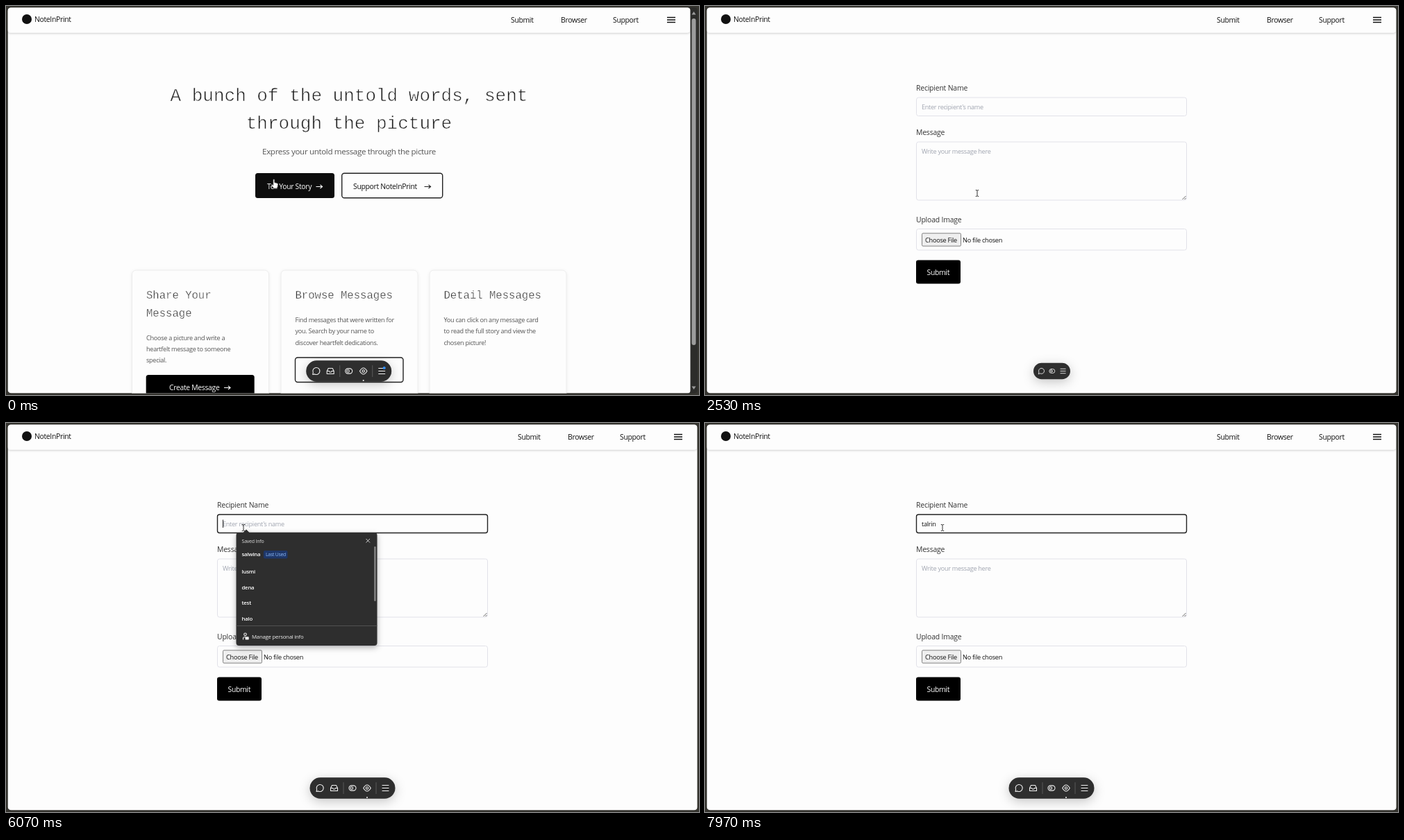
Recreate the animation shown at these times as an HTML page. Size 998x561 px, loop 8 s.

```html
<!DOCTYPE html>
<html lang="en">
<head>
<meta charset="utf-8">
<title>NoteInPrint</title>
<style>
  html, body { margin: 0; width: 100%; height: 100%; overflow: hidden; background: #35342f; }
  svg { display: block; width: 100vw; height: 100vh; }
  text { font-family: "Open Sans", "Noto Sans", sans-serif; letter-spacing: -.03em; }
  /* The page-coloured outline thins the strokes of the typewriter face. */
  .mono { font-family: "Liberation Mono", "Courier New", monospace; letter-spacing: 0; stroke: #fdfdfd; stroke-width: .026em; }
  .mid { text-anchor: middle; }
  .medium { font-weight: 500; letter-spacing: -.017em; }
  .bold { font-weight: 600; }
  .line { fill: none; stroke: #eee; stroke-width: 1.1; stroke-linecap: round; stroke-linejoin: round; }
</style>
</head>
<body>
<svg id="stage" viewBox="0 0 998 561" preserveAspectRatio="none"></svg>
<script>
const text = (x, y, s, size = 10.4, fill = '#111', cls = '') =>
  `<text x="${x}" y="${y}" font-size="${size}" fill="${fill}" class="${cls}">${s}</text>`;
const box = (x, y, w, h, r, fill, stroke = 'none', sw = 1, more = '') =>
  `<rect x="${x}" y="${y}" width="${w}" height="${h}" rx="${r}" fill="${fill}" stroke="${stroke}" stroke-width="${sw}" ${more}/>`;
const path = (d, stroke, sw = 1.1, fill = 'none') =>
  `<path d="${d}" stroke="${stroke}" stroke-width="${sw}" fill="${fill}"/>`;
const arrow = (x, y, c) => path(`M${x} ${y}h9m-3-2.6l3 2.6l-3 2.6`, c, 1.2);
const lines = (x, y, step, rows, ...style) =>
  rows.map((s, i) => text(x, y + i * step, s, ...style)).join('');

const nav = right => `
  ${box(2.5, 2.5, right - 2.5, 36, 4, '#fdfdfd', 'none', 0, 'filter="url(#navShadow)"')}
  <circle cx="30" cy="19" r="7" fill="#111"/>
  ${text(41, 23, 'NoteInPrint', 10.4)}
  ${text(right - 258, 24.3, 'Submit')}${text(right - 186, 24.3, 'Browser')}${text(right - 111, 24.3, 'Support')}
  ${path(`M${right - 33} 16.5h12m-12 3.5h12m-12 3.5h12`, '#111', 1.4)}`;

const card = (x, title, y, body) => `
  ${box(x, 381, 197, 210, 6, '#fdfdfd', '#ececec', 1, 'filter="url(#cardShadow)"')}
  ${lines(x + 20.5, 422, 25.7, title, 15.6, '#333', 'mono')}
  ${lines(x + 20.5, y, 16.2, body, 9.1, '#555')}`;

const home = `
  ${box(975, 2, 21, 557, 4, '#2c2c2a')}
  ${box(2.5, 2.5, 983, 556, 4, '#fdfdfd')}
  ${box(987.5, 18, 6, 471, 3, '#9c9c9c')}
  ${path('M987.5 12.5l3-4.5l3 4.5z', 'none', 0, '#9c9c9c')}
  ${path('M987.5 548.5l3 4.5l3-4.5z', 'none', 0, '#9c9c9c')}
  ${nav(985)}
  ${text(494, 137, 'A bunch of the untold words, sent', 26, '#222', 'mono mid')}
  ${text(494, 176.5, 'through the picture', 26, '#222', 'mono mid')}
  ${text(494, 213.5, 'Express your untold message through the picture', 11.6, '#555', 'mid')}
  <rect id="tell" x="359" y="241" width="114" height="36" rx="3.5"/>
  ${text(376, 263.5, 'Tell Your Story', 10.4, '#fff')}${arrow(446.5, 260.5, '#fff')}
  ${box(483.7, 241.2, 145, 35.6, 3.5, '#fdfdfd', '#222', 1.4)}
  ${text(500, 263.5, 'Support NoteInPrint')}${arrow(602.5, 260.5, '#222')}
  ${card(181.5, ['Share Your', 'Message'], 481.7, ['Choose a picture and write a', 'heartfelt message to someone', 'special.'])}
  ${card(396, ['Browse Messages'], 456.2, ['Find messages that were written for', 'you. Search by your name to', 'discover heartfelt dedications.'])}
  ${card(610, ['Detail Messages'], 456.2, ['You can click on any message card', 'to read the full story and view the', 'chosen picture!'])}
  ${box(201.7, 532, 156, 36, 3.5, '#000')}
  ${text(235, 553.5, 'Create Message', 10.4, '#fff')}${arrow(314, 550.5, '#fff')}
  ${box(416.5, 507, 155.5, 35.5, 3.5, '#fdfdfd', '#222', 1.4)}`;

const edge = '#e2e2e9', hint = '#a0a5b0';
const form = `
  ${box(2.5, 2.5, 993, 556, 4, '#fdfdfd')}
  ${nav(995)}
  ${text(304, 121.8, 'Recipient Name', 10.4, '#333', 'medium')}
  <rect id="field" x="304.5" y="132" width="389" height="26.5" rx="3" fill="#fdfdfd"/>
  <text id="entry" x="312" y="149" font-size="9.1"></text>
  <path id="caret" stroke="#222" stroke-width="1"/>
  ${text(304, 185.8, 'Message', 10.4, '#333', 'medium')}
  ${box(304.5, 196, 389, 84, 3, '#fdfdfd', edge)}
  ${text(312, 213.2, 'Write your message here', 9.1, hint)}
  ${path('M687.5 279l5-5m-2 5l2-2', '#555', .9)}
  ${text(304, 311.8, 'Upload Image', 10.4, '#333', 'medium')}
  ${box(304.5, 321.5, 389, 30.5, 3, '#fdfdfd', edge)}
  ${box(312.5, 327.8, 56, 18.4, 1.5, '#efefef', '#767676', .9)}
  ${text(317, 340.5, 'Choose File', 9.2)}${text(371, 340.5, 'No file chosen', 9.2)}
  ${box(304, 366.5, 64, 34, 3, '#000')}
  ${text(319.5, 388, 'Submit', 10.4, '#fff')}`;

const popup = `
  <g filter="url(#shadow)">${box(331.5, 158, 203, 163, 4, '#2e2e2e')}
  ${path('M341 158.5l5-5l5 5z', 'none', 0, '#2e2e2e')}</g>
  ${text(339.5, 173.3, 'Saved Info', 7, '#ddd')}
  ${path('M518.5 167l5.5 5.5m0-5.5l-5.5 5.5', '#ddd', .9)}
  ${text(339.5, 192, 'salwina', 7.8, '#fff', 'bold')}
  ${box(371, 184, 34.5, 11.5, 2, '#1e3769')}${text(374, 192, 'Last Used', 6.8, '#8fbcfa')}
  ${lines(339.5, 217, 22.7, ['lusmi', 'dena', 'test', 'halo'], 7.8, '#fff', 'bold')}
  ${box(530.2, 178, 2.4, 79, 1.2, '#858585')}
  ${path('M331.5 292.5h203', '#555', .9)}
  <g class="line"><circle cx="344.5" cy="304.8" r="1.8"/><path d="M341.5 312v-1.5q0-2 3-2"/></g>
  ${box(344.5, 308.3, 5.2, 4.2, .8, '#eee')}
  ${text(354, 310.6, 'Manage personal info', 7.8, '#eee')}`;

// Toolbar icons are drawn around the bar's own centre.
const at = (x, s) => `<g transform="translate(${x})">${s}</g>`;
const bubble = '<path d="M-4.5 5l.6-3A5 5 0 1 1-1.6 4.4z"/>';
const toggle = '<rect x="-5" y="-3.6" width="10" height="7.2" rx="3.6"/><circle cx="-1.2" r="1.8"/>';
const menu = '<path d="M-4.5-4h9m-9 4h9m-9 4h9"/>';
const fullIcons = at(-47.5, bubble)
  + at(-26.5, '<path d="M-5 0l2-4h6l2 4v4h-10zh3l1 1.5h2l1-1.5h3"/>')
  + '<path d="M-13-8v16M34-8v16" stroke="#555"/>'
  + toggle
  + at(21, '<path d="M-5.3 0Q0-9 5.3 0Q0 9-5.3 0z"/><circle r="1.7"/><circle cy="13.5" r=".5"/>')
  + at(47.5, menu);
const smallIcons = [bubble, toggle, menu]
  .map((s, i) => `<g transform="translate(${i * 15.8 - 15.5}) scale(.8)">${s}</g>`).join('');

const stage = document.getElementById('stage');
stage.innerHTML = `
  <defs>
    <filter id="navShadow" x="-5%" y="-50%" width="110%" height="220%"><feDropShadow dx="0" dy="1" stdDeviation="1.5" flood-opacity=".22"/></filter>
    <filter id="cardShadow" x="-10%" y="-10%" width="120%" height="120%"><feDropShadow dx="0" dy="1" stdDeviation="2" flood-opacity=".07"/></filter>
    <filter id="shadow" x="-30%" y="-30%" width="160%" height="170%"><feDropShadow dx="0" dy="3" stdDeviation="4" flood-opacity=".3"/></filter>
    <filter id="barShadow" x="-40%" y="-120%" width="180%" height="340%"><feDropShadow dx="0" dy="4" stdDeviation="8" flood-opacity=".22"/></filter>
    <clipPath id="window"><rect x="2.5" y="2" width="993.5" height="556.5" rx="5"/></clipPath>
  </defs>
  <rect width="998" height="561" fill="#35342f"/>
  <g clip-path="url(#window)">
    <g id="home">${home}</g>
    <g id="form">${form}</g>
    <g id="bar">
      <rect id="pill" fill="#2d2d2d" filter="url(#barShadow)"/>
      <g id="full" class="line">${fullIcons}<circle id="badge" cx="51" cy="-4.5" r="2" fill="#3291ff" stroke="none"/></g>
      <g id="small" class="line">${smallIcons}</g>
    </g>
    <g id="status">
      ${box(2, 543, 137, 16, 3, '#3b3b3b')}
      ${text(5, 554, 'https://noteinprint.vercel.app/submit', 7.8, '#eee')}
    </g>
  </g>
  <g id="popup">${popup}</g>
  <g id="hand">${path('M-2.2-5.8q1.4-1 2 .3v4l3.8 1q1.3.5 1.2 2l-.6 3.5l-1 2h-4.7l-3.1-4.4q-.3-1.6 1.1-1.2l1.3 1.1z', '#333', .7, '#fff')}</g>
  <g id="beam">${path('M-2.2-4.5h1.4l.8.8l.8-.8h1.4M0-4v8M-2.2 4.5h1.4l.8-.8l.8.8h1.4', '#333', 1)}</g>`;

const el = {};
stage.querySelectorAll('[id]').forEach(n => el[n.id] = n);
const set = (id, attrs) => { for (const k in attrs) el[id].setAttribute(k, attrs[k]); };
const show = (id, opacity) => set(id, { opacity: +opacity });

const LOOP = 8000, SWAP = 1670, FOCUS = 3680;
const moves = [[0, 387, 256], [900, 387, 256], [1300, 392, 270], [2800, 392, 270],
  [3540, 389, 134], [3680, 386, 147], [4470, 386, 147], [5300, 342, 151], [LOOP, 342, 151]];
const word = 'talrin', keys = [6600, 6700, 7040, 7140, 7250, 7370];

const ramp = (t, a, b) => Math.min(1, Math.max(0, (t - a) / (b - a)));
const mix = (a, b, p) => a + (b - a) * p;
const ease = p => p * p * (3 - 2 * p);

function pointer(t) {
  const i = moves.findIndex(m => m[0] > t), a = moves[i - 1], b = moves[i];
  const p = ease(ramp(t, a[0], b[0]));
  return `translate(${mix(a[1], b[1], p)} ${mix(a[2], b[2], p)})`;
}

function draw(t) {
  const onForm = t >= SWAP, focused = t >= FOCUS;
  show('home', !onForm);
  show('form', onForm);

  const shade = Math.round(mix(13, 43, ramp(t, 1180, 1330)));
  set('tell', { fill: `rgb(${shade},${shade},${shade})` });
  show('status', ramp(t, 1270, 1390) * (1 - ramp(t, SWAP, 1790)));

  const grow = onForm ? ease(ramp(t, 3640, 3840)) : 1;
  const w = mix(53, 123, grow), h = mix(23.5, 30.5, grow);
  set('bar', { transform: `translate(${onForm ? 499 + (1 - grow) * .5 : 493.7} 526.5)` });
  show('bar', onForm ? ramp(t, 2000, 2150) : 1);
  set('pill', { x: -w / 2, y: -h / 2, width: w, height: h, rx: h / 2 });
  show('full', ramp(grow, .5, 1));
  show('small', 1 - ramp(grow, 0, .5));
  show('badge', !onForm);

  const typed = keys.filter(k => k <= t).length;
  el.entry.textContent = typed ? word.slice(0, typed) : "Enter recipient's name";
  set('entry', { fill: typed ? '#111' : hint });
  set('field', { stroke: focused ? '#222' : edge, 'stroke-width': focused ? 1.4 : 1 });
  const caretX = 312.5 + (typed ? el.entry.getComputedTextLength() : 0);
  const since = t - (typed ? keys[typed - 1] : FOCUS);
  set('caret', { d: `M${caretX} 139.5v11.5` });
  show('caret', focused && since % 1000 < 500);

  const open = ramp(t, 3780, 3930) * (1 - ramp(t, 6660, 6800)), s = mix(.95, 1, open);
  show('popup', open);
  set('popup', { transform: `translate(433 239.5) scale(${s}) translate(-433 -239.5)` });

  const place = { transform: pointer(t) };
  set('hand', place);
  set('beam', place);
  show('hand', !onForm);
  show('beam', onForm);
}

const start = performance.now();
(function tick() {
  draw((performance.now() - start) % LOOP);
  requestAnimationFrame(tick);
})();
</script>
</body>
</html>
```
